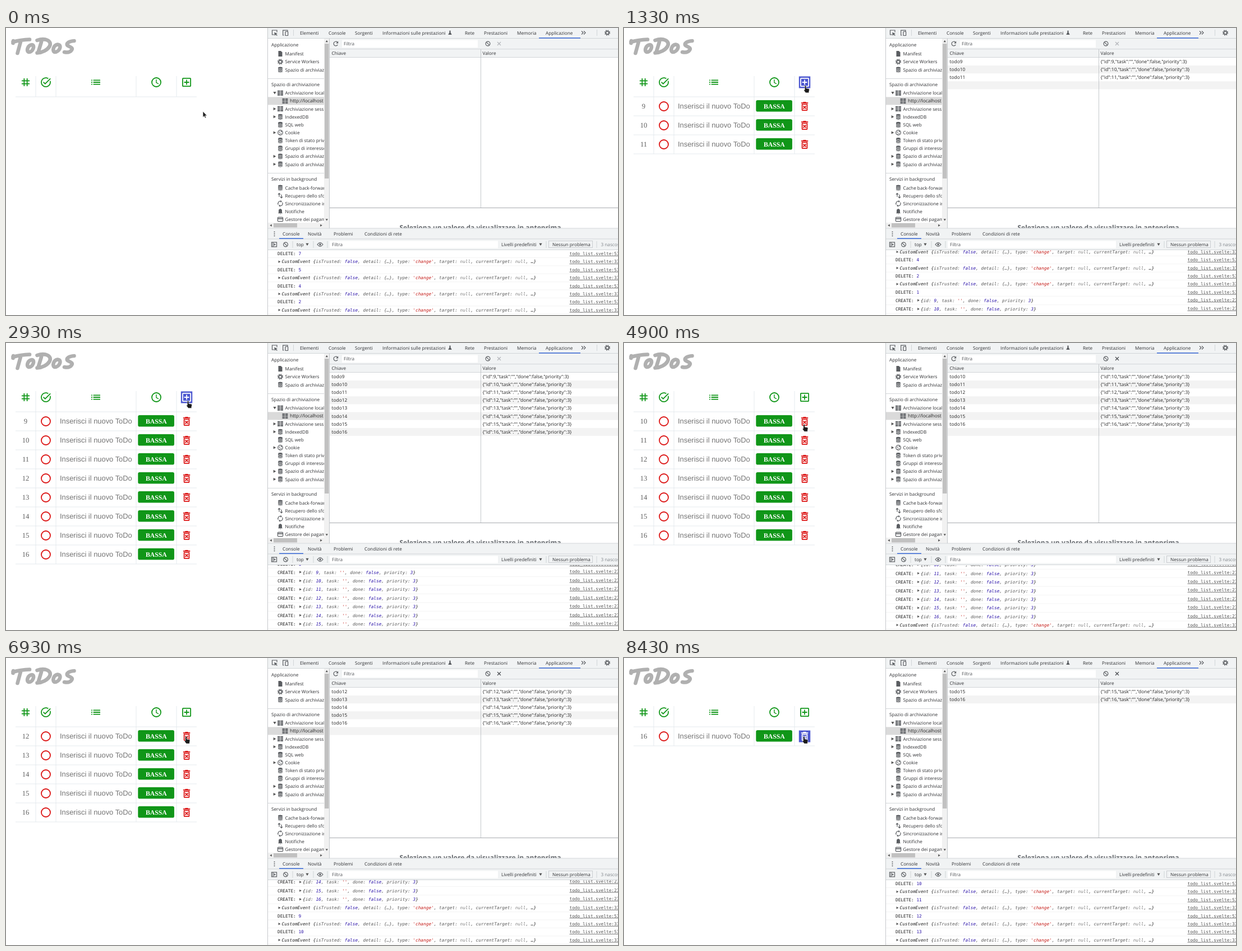
Animation, 1091 px wide and 513 px high, one loop 8.5 s. Source, as an HTML page:

```html
<!DOCTYPE html>
<html lang="it">
<head>
<meta charset="utf-8">
<title>ToDos</title>
<style>
html, body { margin: 0; width: 100%; height: 100%; overflow: hidden; background: #fff; }
svg { display: block; width: 1091px; height: 513px; }
text { font: 8.2px "Open Sans", "Noto Sans", sans-serif; fill: #303134; white-space: pre; text-rendering: geometricPrecision; }
.grid { font-size: 8.4px; fill: #222; }
.big { font-size: 12px; font-weight: 700; fill: #5f6368; }
.mono { font: 7.78px "DejaVu Sans Mono", monospace; fill: #222; }
.it { font-style: italic; }
.n { fill: #2a12a8; }
.s { fill: #c41a16; }
.k { fill: #5a5a5a; }
.u { fill: #808080; }
.link { fill: #545454; text-decoration: underline; }
.num { font: 12.7px "Liberation Serif", serif; fill: #606060; }
.task { font: 12.9px "Liberation Sans", sans-serif; fill: #757575; }
.btn { font: 700 11.7px "Liberation Serif", serif; fill: #fff; }
.mid { text-anchor: middle; }
.hint { fill: #505357; }
.dim { fill: #80868b; }
.ic { fill: #5a5d61; }
.ln { fill: none; stroke: #5a5d61; stroke-width: 1.2; }
</style>
</head>
<body>
<svg id="stage" viewBox="0 0 1091 513" xmlns="http://www.w3.org/2000/svg"></svg>
<script>
const LOOP = 8500;
const GREEN = '#109618', RED = '#dc1414', BLUE = '#4d58d0', BAR = '#f1f3f4', EDGE = '#cacdd1', TAB = '#2b5fd4';

const icons = {
  tag: 'M20 10V8h-4V4h-2v4h-4V4H8v4H4v2h4v4H4v2h4v4h2v-4h4v4h2v-4h4v-2h-4v-4h4zm-6 4h-4v-4h4v4z',
  check: 'M22 5.18 10.59 16.6l-4.24-4.24 1.41-1.41 2.83 2.83 10-10zM19.79 10.22C19.92 10.79 20 11.39 20 12c0 4.42-3.58 8-8 8s-8-3.58-8-8 3.58-8 8-8c1.58 0 3.04.46 4.28 1.25l1.44-1.44C16.1 2.67 14.13 2 12 2 6.48 2 2 6.48 2 12s4.48 10 10 10 10-4.48 10-10c0-1.19-.22-2.33-.6-3.39z',
  list: 'M3 13h2v-2H3zm0 4h2v-2H3zm0-8h2V7H3zm4 4h14v-2H7zm0 4h14v-2H7zM7 7v2h14V7z',
  plus: 'M19 3H5c-1.1 0-2 .9-2 2v14c0 1.1.9 2 2 2h14c1.1 0 2-.9 2-2V5c0-1.1-.9-2-2-2zm0 16H5V5h14zm-8-2h2v-4h4v-2h-4V7h-2v4H7v2h4z',
  trash: 'M14.12 10.47 12 12.59l-2.13-2.12-1.41 1.41L10.59 14l-2.12 2.12 1.41 1.41L12 15.41l2.12 2.12 1.41-1.41L13.41 14l2.12-2.12zM15.5 4l-1-1h-5l-1 1H5v2h14V4zM6 19c0 1.1.9 2 2 2h8c1.1 0 2-.9 2-2V7H6zM8 9h8v10H8z'
};

const line = (x1, y1, x2, y2, c = EDGE, w = 0.8) =>
  `<path d="M${x1} ${y1}L${x2} ${y2}" stroke="${c}" stroke-width="${w}" fill="none"/>`;
const rect = (x, y, w, h, fill, more = '') =>
  `<rect x="${x}" y="${y}" width="${w}" height="${h}" fill="${fill}" ${more}/>`;
const text = (x, y, s, cls = '') => `<text x="${x}" y="${y + 3}" class="${cls}">${s}</text>`;
const icon = (name, x, y, c) =>
  `<path d="${icons[name]}" fill="${c}" fill-rule="evenodd" transform="translate(${x - 10.6} ${y - 10.6}) scale(.884)"/>`;
const at = (x, y, body) => `<g transform="translate(${x} ${y})">${body}</g>`;
const ring = (x, y, c) => `<circle cx="${x}" cy="${y}" r="8" fill="none" stroke="${c}" stroke-width="1.8"/>`;
const path = (d, cls = 'ln') => `<path d="${d}" class="${cls}"/>`;
const tri = (x, y, dir = 'r', r = 2.3) => {
  const turn = { r: 0, d: 90, l: 180, u: 270 }[dir];
  return `<path d="M${-r} ${-r - .3}L${r} 0L${-r} ${r + .3}z" fill="#555" transform="translate(${x} ${y}) rotate(${turn})"/>`;
};

// Small panel icons, drawn around their centre
const small = {
  file: path('M-3.5-5H1L3.5-2.5V5H-3.5z', 'ic'),
  gear: `<circle r="2.7" class="ln" style="stroke-width:1.6"/><circle r="4.2" class="ln" stroke-dasharray="1.65 1.65" style="stroke-width:1.8"/>`,
  db: path('M-4-3.4a4 1.6 0 0 1 8 0a4 1.6 0 0 1-8 0zM-4-2.2q4 2.4 8 0v2q-4 2.2-8 0zM-4 .7q4 2.2 8 0v1.8q-4 2.2-8 0zM-4 3.3q4 2.2 8 0v.8q-4 2.2-8 0z', 'ic'),
  table: path('M-5-4.5h4.6v2.5H-5zM.4-4.5H5v2.5H.4zM-5-1.2h4.6v2.4H-5zM.4-1.2H5v2.4H.4zM-5 2h4.6v2.5H-5zM.4 2H5v2.5H.4z', 'ic'),
  cookie: `<circle r="4.3" class="ln"/>` + path('M-2.5-1.5h2v1.6h-2zM.5 1h1.6v1.6H.5zM-2 2h1.4v1.2H-2zM1-3h1.6v2H1z', 'ic'),
  swap: path('M-2 2V-4M-4-2L-2-4.2L0-2M2-2V4M0 2L2 4.2L4 2'),
  sync: path('M-3.6 2A4 4 0 0 1 1-3.9M3.6-2A4 4 0 0 1-1 3.9') + path('M.5-6L3-3.8.5-1.8zM-.5 6L-3 3.8-.5 1.8z', 'ic'),
  bell: path('M-4 3.3L-3 2V-1Q-3-4-.7-4.4a.8.8 0 0 1 1.4 0Q3-4 3-1V2L4 3.3zM-1 4h2l-1 1z', 'ic'),
  card: `<rect x="-4.6" y="-3.6" width="9.2" height="7.2" rx="1" class="ln"/>` + path('M-4.6-2h9.2v1.7h-9.2z', 'ic'),
  block: `<circle r="3.9" class="ln"/>` + path('M-2.7-2.7L2.7 2.7'),
  reload: path('M3.3 1.8A3.8 3.8 0 1 1 2.6-2.7') + path('M4.2-4.4V-.5H.3z', 'ic'),
  inspect: path('M0 3.5H-4.5V-4.5H4V-1') + path('M-1-.8L5 1.6 2.6 2.5 4.8 4.6 3.9 5.4 1.7 3.2.7 5.4z', 'ic'),
  device: path('M-2.6 4.5H-4.3V-4.3H4V-2.6') + `<rect x="0" y="-2" width="4.6" height="7" rx=".6" class="ln"/>`,
  eye: path('M-5 0Q0-6.6 5 0Q0 6.6-5 0z') + `<circle r="1.7" class="ic"/>`,
  side: `<rect x="-4.5" y="-4" width="9" height="8" class="ln"/>` + path('M-2-4V4') + path('M-.3-2.2L3 0-.3 2.2z', 'ic'),
  dots: [-3.4, 0, 3.4].map(y => `<circle cy="${y}" r="1" class="ic"/>`).join(''),
  flask: path('M-1.4-3.8h2.8v.9H1V-.8L3.2 3.4H-3.2L-1-.8V-2.9h-.4z', 'ic')
};
const mini = (name, x, y) => at(x, y, small[name]);

const title = `<g role="img" aria-label="ToDos" fill="none" stroke="#b0b0b0" stroke-width="6.6" stroke-linecap="round" stroke-linejoin="round">
<path d="M12.5 25Q26 21 42 20.500M13 23L12.500 27M26.500 23L20.500 45"/>
<path d="M46 30C38 31 36 42 40.500 43C47 44 53 31 46 30z"/>
<path d="M63 25L57.500 43M55.500 22C70 17 83 23 77.500 33C74 39 65 44 55.500 44.500"/>
<path d="M92 29.500C84 31 82 42 87 43C95 43 101 30 92 29.500z"/>
<path d="M121.500 23C112 23.500 106 28 110 31.500C114 34 120 35 117 39.500C114 44 109 44 104 43"/></g>`;

function sidebar() {
  const items = [
    ['file', 46, 'Manifest'], ['gear', 60.3, 'Service Workers'], ['db', 74.5, 'Spazio di archiviazione'],
    ['table', 116.3, 'Archiviazione locale', 'd'], ['table', 144.6, 'Archiviazione sessione', 'r'],
    ['db', 158.7, 'IndexedDB', 'r'], ['db', 172.8, 'SQL web'], ['cookie', 187, 'Cookie', 'r'],
    ['db', 201, 'Token di stato privato'], ['db', 215.2, 'Gruppi di interesse'],
    ['db', 229.4, 'Spazio di archiviazione condiviso', 'r'], ['db', 243.5, 'Spazio di archiviazione cache', 'r'],
    ['db', 285.6, 'Cache back-forward'], ['swap', 299.7, 'Recupero dello sfondo'],
    ['sync', 313.8, 'Sincronizzazione in background'], ['bell', 327.9, 'Notifiche'], ['card', 342, 'Gestore dei pagamenti']
  ];
  let out = rect(467, 123.4, 100, 14, '#dadada') + mini('table', 497.5, 130.4) + text(506, 130.4, 'http://localhost', 'grid');
  for (const [ic, y, s, arrow] of items)
    out += mini(ic, 489, y) + text(497.5, y, s) + (arrow ? tri(479, y, arrow) : '');
  for (const [y, s] of [[30.3, 'Applicazione'], [101, 'Spazio di archiviazione'], [269.5, 'Servizi in background']])
    out += text(473, y, s);
  return `<g clip-path="url(#side)">${out}${line(467, 90.5, 567, 90.5)}${line(467, 259.5, 567, 259.5)}</g>`
    + rect(567, 19, 9.5, 329, '#f1f1f1') + rect(568, 28, 7.5, 241, '#c1c1c1')
    + rect(467, 348, 109.5, 9.5, '#f1f1f1') + rect(477, 349, 42, 7.5, '#c1c1c1')
    + tri(571.8, 23.5, 'u', 1.8) + tri(571.8, 343, 'd', 1.8) + tri(472, 352.8, 'l', 1.8) + tri(562, 352.8, 'r', 1.8);
}

function chrome() {
  let out = rect(467, 0, 624, 18.5, BAR) + line(467, 18.5, 1091, 18.5)
    + mini('inspect', 479, 8.5) + mini('device', 498, 8.5) + line(512.5, 3, 512.5, 14);
  const tabs = [[524, 'Elementi'], [575, 'Console'], [622, 'Sorgenti'], [671, 'Informazioni sulle prestazioni'],
    [818, 'Rete'], [852, 'Prestazioni'], [911, 'Memoria'], [962, 'Applicazione']];
  for (const [x, s] of tabs) out += text(x, 8.5, s);
  out += mini('flask', 791.5, 8.5) + path('M1026 5.5L1029 8.5L1026 11.5M1030 5.5L1033 8.5L1030 11.5')
    + line(1053.5, 3, 1053.5, 14) + mini('gear', 1072, 8.5) + rect(950, 17.2, 74, 1.4, TAB);

  out += sidebar() + line(576.5, 19, 576.5, 358, '#b8bbbf');

  out += rect(577, 19, 514, 33.5, BAR) + line(577, 37.7, 1091, 37.7) + line(577, 52.5, 1091, 52.5)
    + mini('reload', 588, 28) + rect(599, 21.5, 242, 13.5, '#fff') + text(602, 28.4, 'Filtra', 'hint') + mini('block', 859, 28)
    + text(580.5, 45.3, 'Chiave') + text(849.5, 45.3, 'Valore');

  out += `<g clip-path="url(#preview)"><text x="845.5" y="361.3" class="big mid">Seleziona un valore da visualizzare in anteprima</text></g>`;

  out += rect(467, 358, 624, 38.5, BAR) + line(467, 358, 1091, 358) + line(467, 377, 1091, 377) + line(467, 396.5, 1091, 396.5)
    + mini('dots', 478.5, 368) + rect(487, 375.6, 43, 1.4, TAB);
  for (const [x, s] of [[493, 'Console'], [538, 'Novità'], [584, 'Problemi'], [639, 'Condizioni di rete']])
    out += text(x, 367.6, s);
  out += mini('side', 478, 387) + mini('block', 498.5, 387) + text(518, 387, 'top') + tri(537, 387, 'd') + mini('eye', 560, 387)
    + rect(577, 380.5, 300, 13, '#fff') + text(581, 387.4, 'Filtra', 'hint')
    + text(883, 386.6, 'Livelli predefiniti') + tri(953, 387, 'd')
    + rect(967.5, 380.5, 78, 12, 'none', `stroke="${EDGE}"`) + text(974, 386.6, 'Nessun problema')
    + text(1060.5, 386.6, '3 nascosti', 'dim');
  for (const x of [511, 548, 573, 963, 1053]) out += line(x, 381, x, 393);
  return out + line(466.5, 0, 466.5, 513, '#b8bbbf');
}

const cols = [53, 89, 232, 304];
const cellEdges = (y1, y2) => cols.map(x => line(x, y1, x, y2, '#dfe5ea')).join('') + line(17, y2, 340, y2, '#dfe5ea');

function header() {
  return cellEdges(86, 123) + icon('tag', 35, 97, GREEN) + icon('check', 71, 97, GREEN) + icon('list', 160, 97, GREEN)
    + ring(268, 97, GREEN) + line(267.9, 92, 267.9, 97.7, GREEN, 1.4) + line(267.6, 97.3, 272, 100, GREEN, 1.4);
}

const hot = (name, y, on, c) => (on ? rect(311.8, y - 10.5, 20.4, 21, BLUE) : '') + icon(name, 322, y, on ? '#fff' : c);

function rows(ids, hotTrash) {
  return ids.map((id, i) => {
    const y = 140 + 34 * i;
    return cellEdges(y - 17, y + 17) + `<text x="35" y="${y + 4.2}" class="num mid">${id}</text>` + ring(71, y, RED)
      + `<text x="96" y="${y + 4.4}" class="task">Inserisci il nuovo ToDo</text>`
      + rect(235.3, y - 11, 64.6, 20.6, GREEN, 'rx="2.8"') + `<text x="267.8" y="${y + 3.7}" class="btn mid">BASSA</text>`
      + hot('trash', y, hotTrash && !i, RED);
  }).join('');
}

function storage(ids) {
  const h = 14.13, top = 52.9;
  let out = '';
  for (let i = 1; i <= ids.length; i += 2) out += rect(577, top + h * i, 514, h, '#f3f3f3');
  ids.forEach((id, i) => {
    const y = top + h * (i + .5);
    out += text(580.5, y, 'todo' + id, 'grid') + text(849.5, y, `{"id":${id},"task":"","done":false,"priority":3}`, 'grid');
  });
  return out + line(846.5, 38, 846.5, 321.5, '#b8bbbf') + line(577, 321.5, 1091, 321.5, '#a8abaf', 1);
}

const span = (cls, s) => `<tspan class="${cls}">${s}</tspan>`;
const pair = (key, cls, val) => span('k', key + ': ') + span(cls, val);
const join = parts => parts.join(span('k', ', '));
const eventText = 'CustomEvent {' + join([pair('isTrusted', 'n', 'false'), pair('detail', 'k', '{…}'), pair('type', 's', "'change'"),
  pair('target', 'u', 'null'), pair('currentTarget', 'u', 'null'), '…']) + '}';
const itemText = id => '{' + join([pair('id', 'n', id), pair('task', 's', "''"), pair('done', 'n', 'false'), pair('priority', 'n', 3)]) + '}';

const kinds = {
  event: { h: 14.4, ln: 33, draw: y => tri(487.5, y + .3, 'r', 1.9) + text(491.5, y, eventText, 'mono it') },
  del: { h: 14.4, ln: 53, draw: (y, id) => text(484, y, 'DELETE: ' + span('n', id), 'mono') },
  make: { h: 15.45, ln: 23, lift: 1.2, draw: (y, id) => text(484, y, 'CREATE:', 'mono') + tri(525, y, 'r', 1.9) + text(529, y, itemText(id), 'mono it') }
};

function consoleLog(made, gone) {
  const log = [];
  const drop = id => log.push(['event'], ['del', id]);
  [7, 5, 4, 2, 1].forEach(drop);
  for (let i = 0; i < made; i++) log.push(['make', 9 + i]);
  for (let i = 0; i < gone; i++) drop(9 + i);
  let out = '', bottom = 525.7;
  for (const [kind, id] of log.reverse()) {
    const k = kinds[kind], y = bottom - k.h / 2 - .3;
    out += k.draw(y, id) + text(1004.5, y - (k.lift || 0), 'todo_list.svelte:' + k.ln, 'mono link')
      + line(467, bottom, 1091, bottom, '#f0f0f0', .7);
    bottom -= k.h;
    if (bottom < 396) break;
  }
  return out;
}

// [list changes, storage and log change]
const creates = [[420, 510], [830, 910], [1270, 1330], [1460, 1520], [1660, 1720], [1870, 1930], [2080, 2140], [2290, 2350]];
const deletes = [[4340, 4420], [6420, 6480], [6860, 6930], [7270, 7330], [7670, 7730], [7890, 7960], [8430, LOOP]];
const track = [[0, 351, 149], [40, 351, 149], [120, 337, 124], [200, 323.5, 103], [2900, 323.5, 103], [2930, 324.5, 103.5],
  [3150, 331, 125], [3350, 331, 152], [3520, 320, 150], [3700, 319.5, 141], [3780, 319.5, 141], [3820, 319.5, 139],
  [4860, 319.5, 139], [4900, 321, 145], [5080, 331, 211.5], [5290, 331, 211.5], [5600, 328, 190], [5880, 312.5, 163],
  [6140, 319, 142.5], [6190, 320, 142], [6240, 321, 140.3], [LOOP, 321, 140.3]];

const ARROW = '<path d="M0 0V10.6L2.4 8.4 4 12 5.7 11.3 4.1 7.8H7.3z" fill="#222" stroke="#fff" stroke-width=".6"/>';
const HAND = '<path d="M-.2 0C.9 0 1.3.7 1.3 1.5V4.8L5.3 5.5C6.5 5.7 7 6.4 6.9 7.4L6.2 10.8V12.8H.4L-2.5 8.9C-3 7.9-2 7.1-1.3 7.7V1.5C-1.3.6-1 0-.2 0z" fill="#1a1a1a" stroke="#fff" stroke-width=".5"/>';

const clip = (id, x, y, w, h) => `<clipPath id="${id}">${rect(x, y, w, h, '#000')}</clipPath>`;
const stage = document.getElementById('stage');
stage.innerHTML = `<defs>${clip('side', 467, 19, 100, 329)}${clip('preview', 577, 322, 514, 35.6)}${clip('log', 467, 397, 624, 116)}</defs>`
  + title + header() + chrome()
  + '<g id="plus"/><g id="rows"/><g id="store"/><g id="clear"/><g id="con" clip-path="url(#log)"/><g id="cursor"/>';
const layer = id => document.getElementById(id);
const count = (list, col, t) => list.filter(e => t >= e[col]).length;
const range = (from, to) => Array.from({ length: Math.max(0, to - from) }, (_, i) => 9 + from + i);

const shown = {};
function put(id, key, make) {
  if (shown[id] === key) return;
  shown[id] = key;
  layer(id).innerHTML = make();
}

function pointer(t) {
  const i = track.findIndex(p => p[0] > t);
  const [t0, x0, y0] = track[i - 1], [t1, x1, y1] = track[i];
  const f = (t - t0) / (t1 - t0);
  return [x0 + (x1 - x0) * f, y0 + (y1 - y0) * f];
}

function draw(t) {
  const made = count(creates, 0, t), gone = count(deletes, 0, t);
  const saved = count(creates, 1, t), wiped = count(deletes, 1, t);
  const hotPlus = t >= 420 && t < 4130;
  const hotTrash = (t >= 6710 && t < 6930) || t >= 8090;
  const canClear = t >= 4340;
  put('plus', hotPlus, () => hot('plus', 97, hotPlus, GREEN));
  put('rows', [made, gone, hotTrash].join(), () => rows(range(gone, made), hotTrash));
  put('store', [saved, wiped].join(), () => storage(range(wiped, saved)));
  put('con', [saved, wiped].join(), () => consoleLog(saved, wiped));
  put('clear', canClear, () => {
    const c = canClear ? '#4a4d51' : '#b4b7bb';
    return line(876, 25, 882, 31, c, 1.3) + line(882, 25, 876, 31, c, 1.3);
  });

  const [x, y] = pointer(t);
  const row = Math.round((y - 140) / 34);
  const overTrash = row >= 0 && row < made - gone && Math.abs(y - 140 - 34 * row) < 10.6;
  const over = x > 311.5 && x < 332.5 && ((y > 86 && y < 107.6) || overTrash);
  put('cursor', over, () => over ? HAND : ARROW);
  layer('cursor').setAttribute('transform', `translate(${x} ${y})`);
}

const start = performance.now();
function tick() {
  draw((performance.now() - start) % LOOP);
  requestAnimationFrame(tick);
}
tick();
</script>
</body>
</html>
```
